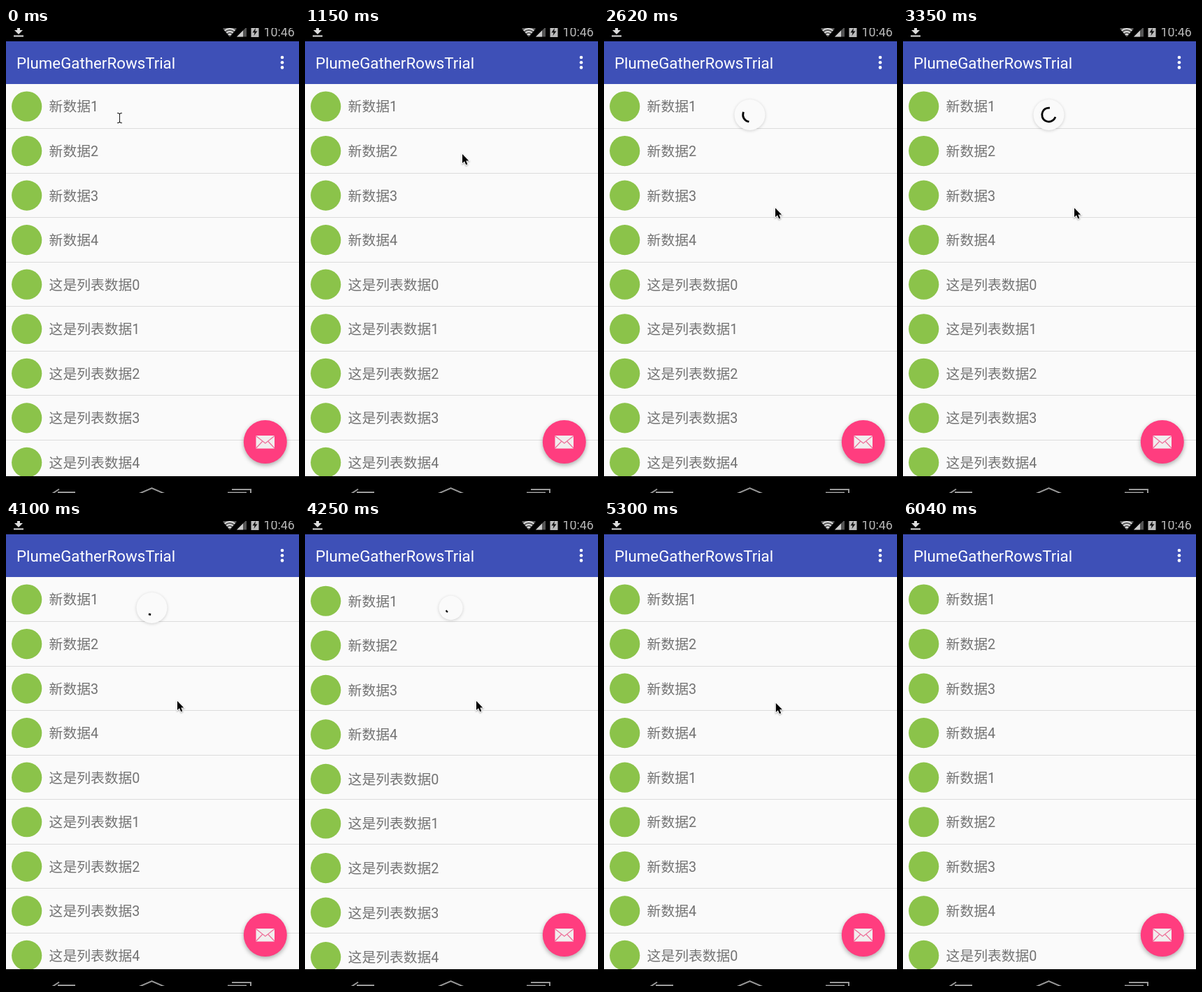
Animation of 419 by 664 pixels, one loop 6460 ms. Source, as an HTML page with a canvas:

```html
<!DOCTYPE html>
<html lang="zh">
<head>
<meta charset="utf-8">
<title>List refresh</title>
<style>
  html, body { margin: 0; width: 100%; height: 100%; overflow: hidden; background: #000; }
  canvas { display: block; }
</style>
</head>
<body>
<canvas id="stage" width="419" height="664"></canvas>
<script>
const c = document.getElementById('stage').getContext('2d');
const LOOP = 6460, STEP = 147, RAD = Math.PI / 180;
const BAR = 19, TOP = 80, NAV = 640, PITCH = 63.55;
const FONT = 'Roboto, "Noto Sans CJK SC", "Noto Sans CJK", sans-serif';

// Moments of the refresh, in ms
const PULLING = 1450, RELEASE = 2191, SPIN = 2857, CYCLE = 1333;
const HIDE = 4230, MOVE = 4248, FADE = 4509, LEAVE = 5250, GONE = 6027;
const REST = 124, PULL = 72;

// Pointer stops: time, x, y
const stops = [[0, 162, 128], [580, 214, 432], [1176, 225, 180], [PULLING, 227, 190],
  [1617, 231, 340], [RELEASE, 241, 383], [2400, 245, 257], [LEAVE, 245, 257], [GONE, 357, 670]];

const clamp = v => Math.min(1, Math.max(0, v));
const smooth = v => (1 - Math.cos(Math.PI * clamp(v))) / 2;
const mix = (a, b, k) => a + (b - a) * k;

// cubic-bezier(.4, 0, .2, 1)
function fastOut(x) {
  let lo = 0, hi = 1;
  for (let i = 0; i < 20; i++) {
    const s = (lo + hi) / 2, r = 1 - s;
    if (1.2 * s * r * r + 0.6 * s * s * r + s ** 3 < x) lo = s; else hi = s;
  }
  return lo * lo * (3 - 2 * lo);
}

function pointer(t) {
  const i = Math.max(1, stops.findIndex(s => s[0] >= t));
  const [t0, x0, y0] = stops[i - 1], [t1, x1, y1] = stops[i];
  const k = smooth((t - t0) / (t1 - t0));
  return [mix(x0, x1, k), mix(y0, y1, k)];
}

function rect(x, y, w, h, color) { c.fillStyle = color; c.fillRect(x, y, w, h); }

function disc(x, y, r, color) {
  c.fillStyle = color;
  c.beginPath();
  c.arc(x, y, r, 0, 7);
  c.fill();
}

function shape(d, { fill, stroke, width = 2 }) {
  const p = new Path2D(d);
  if (stroke) { c.strokeStyle = stroke; c.lineWidth = width; c.stroke(p); }
  if (fill) { c.fillStyle = fill; c.fill(p); }
}

function text(s, x, y, size, color) {
  c.font = size + 'px ' + FONT;
  c.fillStyle = color;
  c.fillText(s, x, y);
}

function shadow(blur, dy, alpha) {
  c.shadowBlur = blur;
  c.shadowOffsetY = dy;
  c.shadowColor = `rgba(0,0,0,${alpha})`;
}

function row(label, i, shift, alpha = 1) {
  const y = TOP + PITCH * i + shift;
  c.globalAlpha = alpha;
  disc(29.7, y + 32, 21.6, '#8bc34a');
  text(label, 61.6, y + 39.4, 19.8, '#737373');
  c.globalAlpha = 1;
}

function list(t) {
  rect(0, TOP, 419, NAV - TOP, '#fafafa');
  for (let k = 1; k < 9; k++) rect(0, Math.round(TOP - 0.4 + PITCH * k), 419, 1, '#dcdcdc');
  const fresh = [1, 2, 3, 4].map(n => '新数据' + n);
  const old = [0, 1, 2, 3, 4].map(n => '这是列表数据' + n);
  const shift = 4 * PITCH * smooth((t - MOVE) / 250);
  [...fresh, ...old].forEach((s, i) => row(s, i, shift));
  const alpha = smooth((t - FADE) / 120);
  fresh.forEach((s, i) => row(s, i, 0, alpha));
}

// Height of the disc for a drag of d, with the tension of a stretched pull
function pullY(d) {
  const over = d / 2, q = Math.max(0, over - PULL) / PULL / 4;
  return REST - PULL + Math.min(PULL, over) + 4 * PULL * (q - q * q);
}

// Arc of the spinner in degrees: [start, end]
function arcAt(t, drag) {
  if (t < RELEASE) {
    const end = -270 + drag;
    return [end - 288 * clamp(drag / 2 / PULL), end];
  }
  if (t < SPIN) {
    const k = (t - RELEASE) / (SPIN - RELEASE), end = -70 + 390 * k;
    return [end - 288 * (1 - k), end];
  }
  const turns = (t - SPIN) / CYCLE, u = turns % 1;
  const base = -40 + 288 * Math.floor(turns) + 234 * turns;
  return [2 * u - 1, 2 * u].map(v => base + 288 * fastOut(clamp(v)));
}

function spinner(t) {
  const scale = 1 - clamp((t - HIDE) / 150);
  if (t < PULLING || !scale) return;
  const drag = Math.max(0, pointer(Math.min(t, RELEASE))[1] - 180);
  const [start, end] = arcAt(t, drag);
  c.save();
  c.translate(208.5, mix(pullY(drag), REST, smooth((t - RELEASE) / 200)));
  c.scale(scale, scale);
  shadow(4, 1, 0.17);
  disc(0, 0, 22, '#fafafa');
  shadow(0, 0, 0);
  c.strokeStyle = '#000';
  c.lineWidth = 2.8;
  c.lineCap = 'square';
  c.beginPath();
  c.arc(0, 0, 9.8, (start - 0.5) * RAD, end * RAD);
  c.stroke();
  if (t < RELEASE) {
    c.rotate(end * RAD);
    shape('M4.2 0h11.2l-5.6 5.6z', { fill: '#000' });
  }
  c.restore();
}

function statusBar() {
  rect(0, 0, 419, BAR, '#000');
  shape('M16 0h4v3h4l-6 6l-6-6h4zM11 10.5h14v2h-14z', { fill: '#ddd' });
  shape('M320 13l-10-12q10-8 20 0z', { fill: '#555' });
  for (let r = 3; r < 12; r += 4) {
    c.beginPath();
    c.arc(320, 12, r, -132 * RAD, -48 * RAD);
    c.strokeStyle = '#ddd';
    c.lineWidth = 2;
    c.stroke();
  }
  shape('M330 12.5h14v-14z', { fill: '#555' });
  shape('M330 12.5h9v-9z', { fill: '#ccc' });
  rect(350.5, 0, 11, 13, '#bbb');
  shape('M357 0l-4.5 6.5h3l-1 4.5l5-6.5h-3.2z', { fill: '#111' });
  text('10:46', 368.5, 11.6, 17.8, '#b8b8b8');
}

function appBar() {
  rect(0, BAR, 419, TOP - BAR, '#3e50b7');
  text('PlumeGatherRowsTrial', 15, 58, 22.3, '#fff');
  for (let k = 0; k < 3; k++) disc(395, 42 + 7.2 * k, 2.3, '#fff');
}

function navBar() {
  rect(0, NAV, 419, 664 - NAV, '#000');
  shape('M66 665l10-6.5M74 663h25M189 665.5l19.5-8.5l19.5 8.5M323 659h27v6M317 663.5h27',
    { stroke: '#999' });
}

function mailButton() {
  shadow(6, 2.5, 0.32);
  disc(370.8, 591, 31, '#ff3d7f');
  shadow(0, 0, 0);
  rect(357.5, 582, 26.5, 18.5, '#f1eeee');
  shape('M357.5 582.5l13.3 10.5l13.2-10.5M357.5 600l9-9.5M384 600l-9-9.5',
    { stroke: '#ee6c98', width: 1.2 });
}

function cursor(t) {
  if (t >= GONE) return;
  c.save();
  c.translate(...pointer(t));
  if (t < STEP) {
    const beam = 'M-3-6.5h2l1.5 1.5l1.5-1.5h2M.5-5v11M-3 7.5h2l1.5-1.5l1.5 1.5h2';
    shape(beam, { stroke: '#fff', width: 2.6 });
    shape(beam, { stroke: '#222', width: 1.1 });
  } else {
    const arrow = 'M0 0v13l3-2.7l2.2 5l2.2-.9l-2.1-5h3.9z';
    shadow(2, 1, 0.35);
    shape(arrow, { stroke: '#fff', width: 1.8 });
    shadow(0, 0, 0);
    shape(arrow, { fill: '#000' });
  }
  c.restore();
}

function draw(t) {
  list(t);
  spinner(t);
  statusBar();
  appBar();
  navBar();
  mailButton();
  cursor(t);
}

let origin;
function frame(now) {
  origin ??= now;
  const t = (now - origin) % LOOP;
  draw(Math.floor((t + 30) / STEP) * STEP); // pictures are held, not tweened
  requestAnimationFrame(frame);
}
requestAnimationFrame(frame);
</script>
</body>
</html>
```
